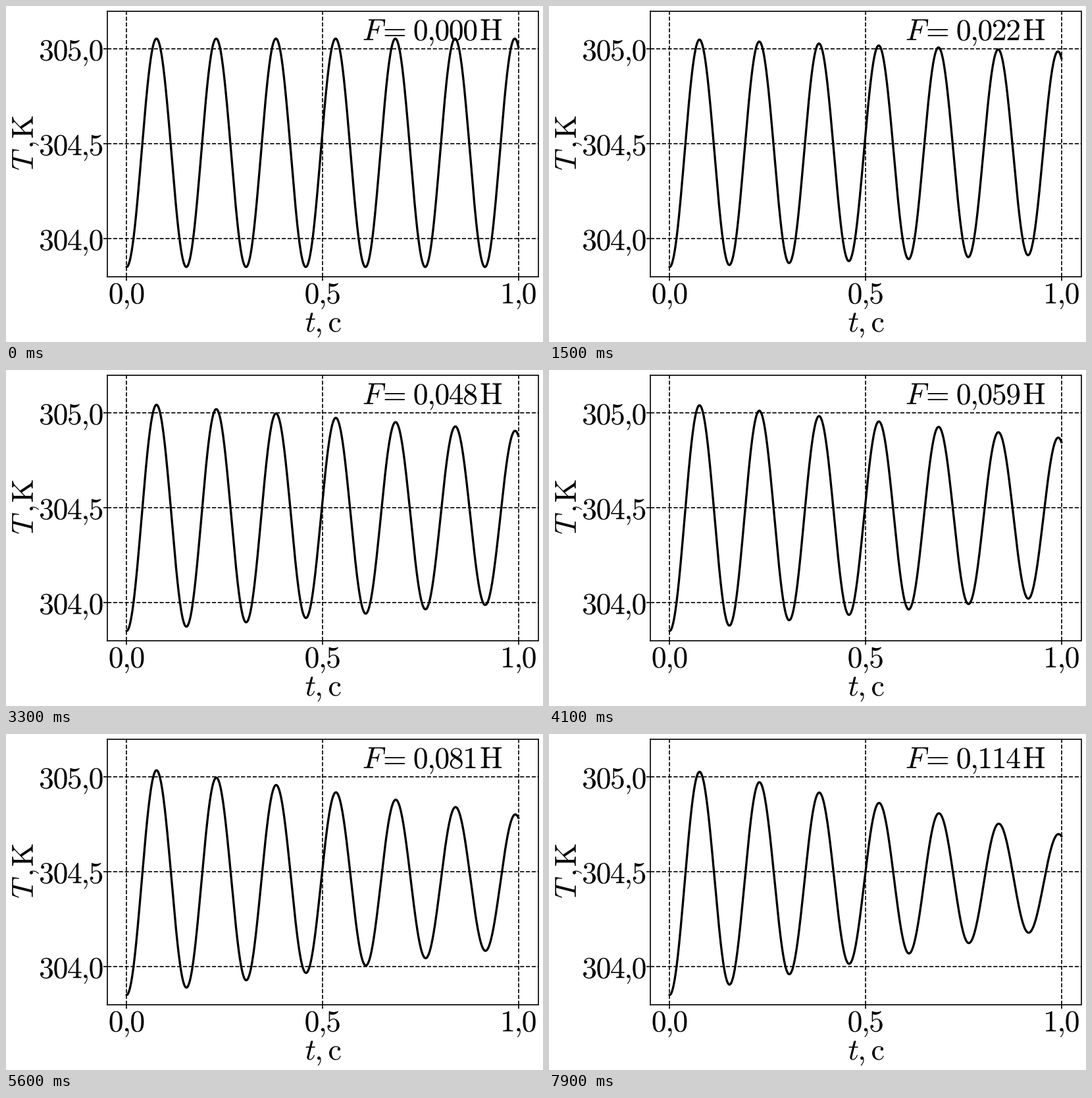
A matplotlib script for the animation above (8000 ms loop, 816 by 510 pixels).

```python
import matplotlib.pyplot as plt
import numpy as np
from matplotlib.animation import FuncAnimation
from matplotlib.patches import PathPatch
from matplotlib.textpath import TextPath
from matplotlib.transforms import Affine2D

plt.rcParams["mathtext.fontset"] = "cm"

W, H, DPI = 816, 510, 120
FRAMES, STEP_MS = 80, 100
EM = 46                      # type size in pixels
TRACK = r"\hspace{-0.039}"   # tight setting for large numerals

MID, AMP = 304.452, 0.602    # rest temperature and first swing, K
FORCE_STEP = 1 / 7 / 99      # friction force added per step, N
SHIFT = 0.12                 # shift of the rest point, K per N

fig = plt.figure(figsize=(W / DPI, H / DPI), dpi=DPI, facecolor="white")
pixels = Affine2D().scale(1 / W, 1 / H) + fig.transFigure


def number(text):
    """Upright numerals with a decimal comma."""
    return r"$\mathrm{" + TRACK.join(text).replace(",", "{,}") + "}$"


def glyphs(text, x, y, angle=0):
    """Outline whose ink starts at x (from left) on baseline y (from top)."""
    path = TextPath((0, 0), text, size=EM)
    place = Affine2D().translate(-path.get_extents().x0, 0)
    return place.rotate_deg(angle).translate(x, H - y).transform_path(path)


def write(text, x, y, angle=0):
    patch = PathPatch(glyphs(text, x, y, angle), fc="black", lw=0,
                      transform=pixels)
    return fig.add_artist(patch)


def temperature(t, force):
    """Oscillation under dry friction: the swing shrinks every half period."""
    period = 0.1524 + 0.0026 * force
    d = SHIFT * force
    half = np.floor(2 * t / period)
    rest = np.where(half % 2 == 0, -d, d)
    swing = AMP - (2 * half + 1) * d
    return MID + rest - swing * np.cos(2 * np.pi * t / period)


left, right, top, bottom = 153.5, 808.5, 7.5, 410.5
ax = fig.add_axes([left / W, 1 - bottom / H, (right - left) / W,
                   (bottom - top) / H])
ax.set(xlim=(-0.05, 1.05), ylim=(303.8, 305.2),
       xticks=[0, 0.5, 1], yticks=[304, 304.5, 305])
ax.tick_params(labelbottom=False, labelleft=False, width=1, length=3.5)
ax.grid(color="black", ls="--", lw=1)
for spine in ax.spines.values():
    spine.set_linewidth(1)

for text, x in (("0,0", 157.5), ("0,5", 455.3), ("1,0", 755)):
    write(number(text), x, 451.5)
for text, y in (("305,0", 82.5), ("304,5", 226.5), ("304,0", 370.5)):
    write(number(text), 52, y)

for text, x in (("$t$", 455.5), (r"$\mathrm{{,}}$", 473),
                (r"$\mathrm{c}$", 491)):
    write(text, x, 494.5)
for text, y in (("$T$", 248.5), (r"$\mathrm{{,}}$", 213),
                (r"$\mathrm{K}$", 200)):
    write(text, 41, y, 90)
for text, x in (("$F$", 543.5), ("$=$", 575.5), (r"$\mathrm{H}$", 721.5)):
    write(text, x, 52)

time = np.linspace(0, 1, 1000)
curve, = ax.plot(time, temperature(time, 0), color="black", lw=2)
counter = write(number("0,000"), 620.5, 52)


def update(i):
    force = i * FORCE_STEP
    curve.set_ydata(temperature(time, force))
    value = f"{force:.3f}".replace(".", ",")
    counter.set_path(glyphs(number(value), 620.5, 52))
    return curve, counter


anim = FuncAnimation(fig, update, frames=FRAMES, interval=STEP_MS,
                     repeat=True, repeat_delay=0)
plt.show()
```
